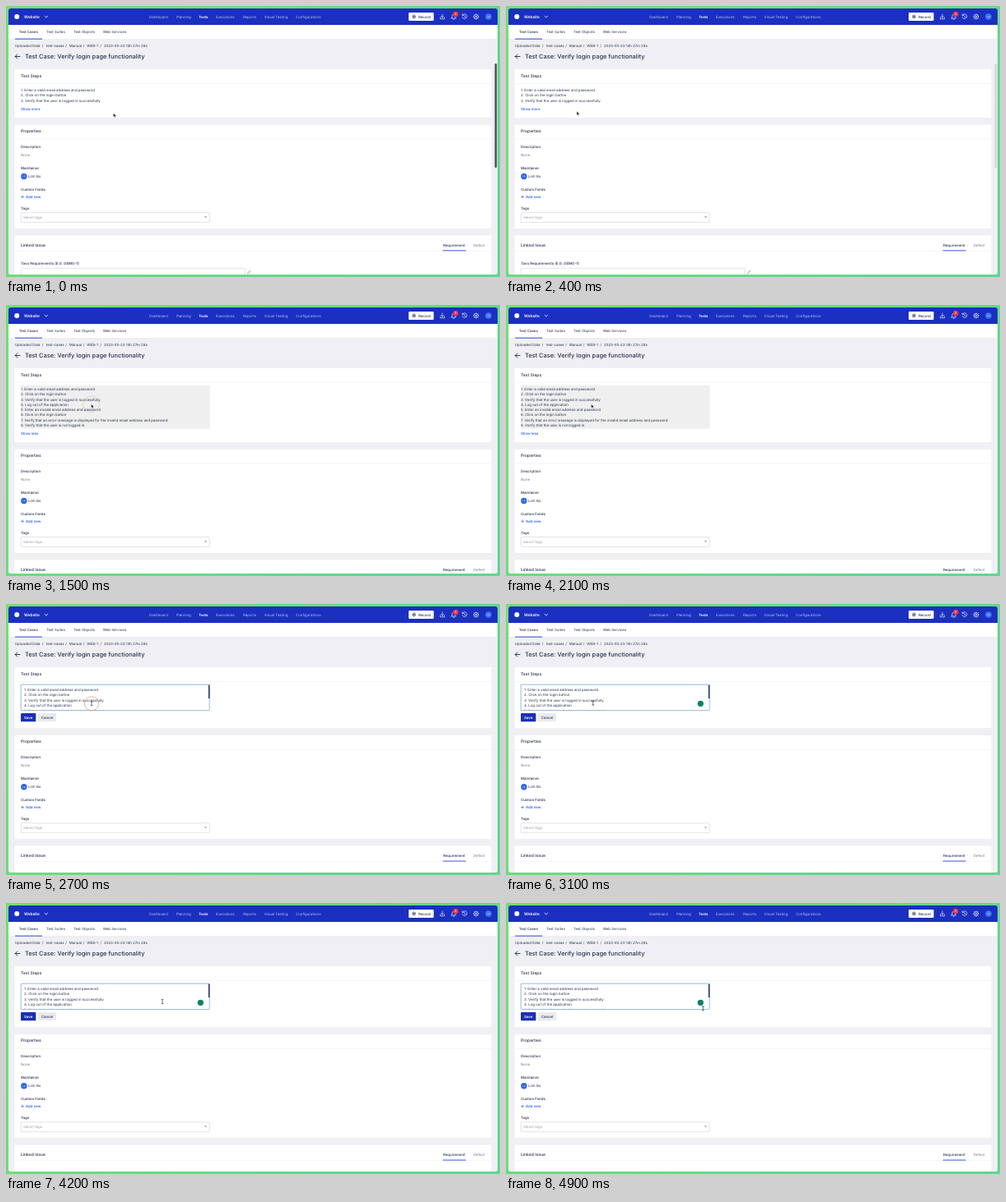
An HTML page for the animation above (5 s loop, 600 px wide and 330 px high).

```html
<!DOCTYPE html>
<html lang="en">
<head>
<meta charset="utf-8">
<title>Test case editor</title>
<style>
html, body { margin: 0; width: 100%; height: 100%; overflow: hidden; background: #68d98a; }
svg { display: block; }
#stage { width: 600px; height: 330px; }
text { font-family: Inter, "Open Sans", sans-serif; font-size: 4.38px; fill: #27304f; text-rendering: geometricPrecision; white-space: pre; }
.m { font-weight: 500; }
.b { font-weight: 600; }
.h { font-weight: 500; font-size: 5px; }
.nav { fill: #bcc5f2; }
.white { fill: #fff; }
.gray { fill: #70758a; }
.pale { fill: #9a9eaa; }
.link { fill: #1f55e0; font-weight: 500; }
.line { fill: none; stroke-linecap: round; stroke-linejoin: round; }
</style>
</head>
<body>
<svg id="stage" viewBox="0 0 600 330" xmlns="http://www.w3.org/2000/svg">
  <defs>
    <linearGradient id="edge" x2="1" y2=".4">
      <stop offset="0" stop-color="#72df70"/>
      <stop offset="1" stop-color="#62d592"/>
    </linearGradient>
    <clipPath id="win"><rect x="3" y="3" width="594" height="324" rx="2.5"/></clipPath>
  </defs>
  <rect width="600" height="330" fill="url(#edge)"/>
  <g clip-path="url(#win)">
    <rect width="600" height="330" fill="#f0f0f4"/>
    <g id="top"></g>
    <g id="short"></g>
    <g id="full"></g>
    <g id="edit"></g>
    <g id="lower"></g>
    <rect id="bar" x="593.6" y="70" width="2.6" height="127" rx="1.3" fill="#50535c"/>
  </g>
  <circle id="helper" cx="236.3" cy="121.3" r="3.6" fill="#0f8069"/>
  <circle id="ring" class="line" stroke="#e6875c" stroke-width=".8" stroke-dasharray="1.2 .9"/>
  <g id="cursor">
    <path id="arrow" d="M0 0V4.7L1.15 3.7 1.9 5.4 2.7 5.05 1.95 3.4 3.4 3.3Z" fill="#111" stroke="#fff" stroke-width=".4"/>
    <path id="hand" d="M-.5 .3Q0-.4.5 .3V2L2.3 2.5Q2.9 2.8 2.7 3.6L2.2 5.2H-.3L-1.8 3.2Q-1.7 2.4-.5 3Z" fill="#fff" stroke="#111" stroke-width=".6"/>
    <path id="beam" class="line" d="M-1-2.7Q0-2.7 0-2Q0-2.7 1-2.7M0-2V2M-1 2.7Q0 2.7 0 2Q0 2.7 1 2.7" stroke="#1d2438" stroke-width=".65"/>
  </g>
</svg>
<script>
const $ = id => document.getElementById(id);
const text = (x, y, s, cls = "", extra = "") => `<text x="${x}" y="${y}" class="${cls}" ${extra}>${s}</text>`;
const rect = (x, y, w, h, fill, extra = "") => `<rect x="${x}" y="${y}" width="${w}" height="${h}" fill="${fill}" ${extra}/>`;
const line = (d, color, w = .7) => `<path class="line" d="${d}" stroke="${color}" stroke-width="${w}"/>`;
const dot = (x, y, r, fill) => `<circle cx="${x}" cy="${y}" r="${r}" fill="${fill}"/>`;
const row = (items, y, cls) => items.map(([x, s, c]) => text(x, y, s, c || cls)).join("");
const mid = 'text-anchor="middle"';
const card = (y, h, split) =>
  rect(10.5, y + .5, 579, h, "#e3e4ea", 'rx="1"') + rect(10.5, y, 579, h, "#fff", 'rx="1"') +
  rect(10.5, y + split, 579, .5, "#ebecf1");
const avatar = (x, y, r, fill) => dot(x, y, r, fill) + text(x, y + .9, "LB", "white", mid + ' style="font-size:2.5px"');

const steps = [
  "Enter a valid email address and password",
  "Click on the login button",
  "Verify that the user is logged in successfully",
  "Log out of the application",
  "Enter an invalid email address and password",
  "Click on the login button",
  "Verify that an error message is displayed for the invalid email address and password",
  "Verify that the user is not logged in."
];
const list = (n, x, y, gap) => steps.slice(0, n).map((s, i) => text(x, y + i * gap, `${i + 1}. ${s}`)).join("");
const stepCard = h => card(77, h, 17) + text(18, 87.2, "Test Steps", "h");

const gear = Array.from({ length: 8 }, (_, i) => {
  const c = Math.cos(i * Math.PI / 4), s = Math.sin(i * Math.PI / 4);
  return `M${571 + 2.5 * c} ${13 + 2.5 * s}L${571 + 3.1 * c} ${13 + 3.1 * s}`;
}).join("");

$("top").innerHTML =
  rect(0, 0, 600, 23, "#1b2fc0") + dot(13.2, 13, 3, "#fff") +
  text(22, 14.7, "Website", "b white", 'style="font-size:4.8px"') +
  line("M47 12.3L48.8 14 50.6 12.3", "#fff", .8) +
  row([[174, "Dashboard"], [207, "Planning"], [234, "Tests", "b white"], [255, "Executions"],
    [288, "Reports"], [313.5, "Visual Testing"], [352, "Configurations"]], 14.6, "nav") +
  rect(489, 8, 30.5, 10, "#fff", 'rx="1"') +
  `<circle cx="495.5" cy="13" r="2" fill="none" stroke="#1d2a4d" stroke-width=".6"/>` + dot(495.5, 13, 1, "#1d2a4d") +
  text(501, 14.6, "Record", "m") +
  line("M530 10V14M528.4 12.6L530 14.2 531.6 12.6M527.4 14V15.8H532.6V14", "#e8ebff") +
  line("M541 15H546.6L545.7 13.6V12Q545.6 10.3 543.8 10.3T541.9 12V13.6ZM543.2 16.2H544.4", "#e8ebff") +
  dot(546.3, 10, 3.2, "#ee3344") + text(546.3, 11.4, "5", "white", mid + ' style="font-size:4px"') +
  line("M554.4 11.2A2.9 2.9 0 1 1 554.2 13.6M554.2 9.9V11.4H555.8M557 11.6V13.2L558.2 13.9", "#e8ebff") +
  `<circle cx="571" cy="13" r="2.5" fill="none" stroke="#e8ebff" stroke-width=".7"/>` + dot(571, 13, .9, "#e8ebff") +
  line(gear, "#e8ebff", .8) + avatar(586, 13, 3.8, "#3f78f2") +
  rect(0, 23, 600, 17.6, "#fff") + rect(0, 40.4, 600, .5, "#e0e1e8") +
  row([[15.7, "Test Cases", "m"], [49, "Test Suites"], [82, "Test Objects"], [117.7, "Web Services"]], 33, "") +
  rect(11, 39.6, 33, 1, "#2a48d8") +
  row([[10.8, "Uploaded Data"], [43.8, "/"], [48.8, "test-cases"], [72.2, "/"], [76.8, "Manual"], [93.8, "/"],
    [98.2, "WEB-1"], [114.3, "/"], [119, "2023-05-23 14h 27m 28s"]], 49.7, "") +
  line("M17 61.5H11.2M13.8 58.9L11.2 61.5 13.8 64.1", "#1e2948", .9) +
  text(23, 64.1, "Test Case: Verify login page functionality", "m", 'style="font-size:7.42px"');

$("short").innerHTML = stepCard(59.5) + list(3, 18, 104, 6.27) +
  text(18, 126.7, "Show more", "link", 'id="more"') + rect(18, 127.5, 24, .5, "#1f55e0", 'id="under"');

$("full").innerHTML = stepCard(90.5) + rect(18, 97.6, 229.5, 53, "#efefef") +
  list(8, 18, 104, 6.27) + text(18, 157.8, "Show less", "link");

$("edit").innerHTML = stepCard(74.5) +
  rect(17.4, 97.4, 230.4, 32.9, "#dce9fa", 'rx="1.2"') +
  rect(18.2, 98.2, 228.9, 31.3, "#fff", 'rx=".8" stroke="#6f9fd6" stroke-width=".6"') +
  `<svg x="18" y="98" width="229" height="31.3" viewBox="18 98 229 31.3">${list(5, 22, 105.7, 6.57)}</svg>` +
  rect(245.8, 98.6, 1.6, 16.4, "#2f3b66") +
  rect(18, 133, 18.3, 10.2, "#1a30b8", 'rx="1"') + text(27.1, 139.7, "Save", "b white", mid) +
  rect(39, 133, 22, 10.2, "#eaebf0", 'rx="1"') + text(50, 139.7, "Cancel", "m", mid);

$("lower").innerHTML =
  card(144.7, 126.5, 17) + text(18, 154, "Properties", "h") +
  text(18, 173.1, "Description", "m") + text(18, 183.1, "None", "gray") +
  text(18, 198.7, "Maintainer", "m") + avatar(21.8, 207.5, 3.7, "#2f66e6") + text(27, 209.1, "Linh Bo") +
  text(18, 224.9, "Custom Fields", "m") +
  line("M18.5 232.4H21.5M20 230.9V233.9", "#1f55e0", .6) + text(24, 234, "Add new", "link") +
  text(18, 247.8, "Tags", "m") +
  rect(18.2, 251.6, 229, 11.8, "#fff", 'rx=".8" stroke="#cdd0d8" stroke-width=".6"') +
  text(21, 259.3, "Select tags", "pale") +
  `<path d="M240.9 256.2H244.1L242.5 258Z" fill="#8b8f9c"/>` +
  card(279.3, 70, 18.6) + text(18, 293, "Linked Issue", "h") +
  text(531, 292.9, "Requirement", "m") + text(567.7, 292.9, "Defect", "gray") +
  rect(530.5, 297.4, 28, .9, "#2a48d8") +
  text(18, 315.4, "Tavo Requirements (E.G. DEMO-1)", "m") +
  rect(18.2, 319.3, 272, 12, "#fff", 'rx=".8" stroke="#cdd0d8" stroke-width=".6"') +
  line("M293.6 325.6L294 324.1 296 322.1 297 323.1 295 325.2Z", "#7c8190", .5);

// Pointer path: time, x, y
const path = [
  [0, 130.5, 130.6], [100, 130, 130.5], [600, 62, 127], [900, 40.5, 124.8], [1200, 40.5, 124.8],
  [1500, 103.5, 120.8], [2500, 103.5, 120.8], [2600, 104, 121.3], [3000, 104, 121.3],
  [3600, 127.3, 112.8], [4200, 190, 120], [4400, 190, 120], [4900, 239.3, 128.3]
];
const fade = [[0, 1], [100, 1], [500, 0]];
const clicks = [1200, 2500];

function at(keys, t) {
  const i = keys.findIndex(k => k[0] > t);
  if (i < 0) return keys[keys.length - 1].slice(1);
  const a = keys[i - 1], b = keys[i], p = (t - a[0]) / (b[0] - a[0]);
  const e = p * p * (3 - 2 * p);
  return a.slice(1).map((v, j) => v + (b[j + 1] - v) * e);
}
const show = (id, on) => $(id).setAttribute("visibility", on ? "visible" : "hidden");

function draw(ms) {
  const t = Math.floor(ms % 5000 / 100) * 100;
  const mode = t < 1300 ? "short" : t < 2600 ? "full" : "edit";
  const shift = { short: 0, full: 31, edit: 15.2 }[mode];
  for (const m of ["short", "full", "edit"]) $(m).style.display = m === mode ? "" : "none";
  $("lower").setAttribute("transform", `translate(0 ${shift})`);

  const hover = t >= 800 && t < 1300;
  $("under").style.display = hover ? "" : "none";
  $("more").style.fontWeight = hover ? 600 : 500;

  const [x, y] = at(path, t);
  $("cursor").setAttribute("transform", `translate(${x} ${y})`);
  show("arrow", !hover && mode !== "edit");
  show("hand", hover);
  show("beam", mode === "edit");

  const click = clicks.find(c => t >= c && t < c + 400);
  show("ring", click !== undefined);
  if (click !== undefined) {
    const age = (t - click) / 100;
    $("ring").setAttribute("cx", x);
    $("ring").setAttribute("cy", y);
    $("ring").setAttribute("r", [4, 6.6, 8.5, 9.6][age]);
    $("ring").setAttribute("opacity", [1, 1, .9, .4][age]);
  }
  show("helper", t >= 3100);
  $("bar").setAttribute("opacity", at(fade, t)[0]);
}

const start = performance.now();
function tick() {
  draw(performance.now() - start);
  requestAnimationFrame(tick);
}
tick();
</script>
</body>
</html>
```
